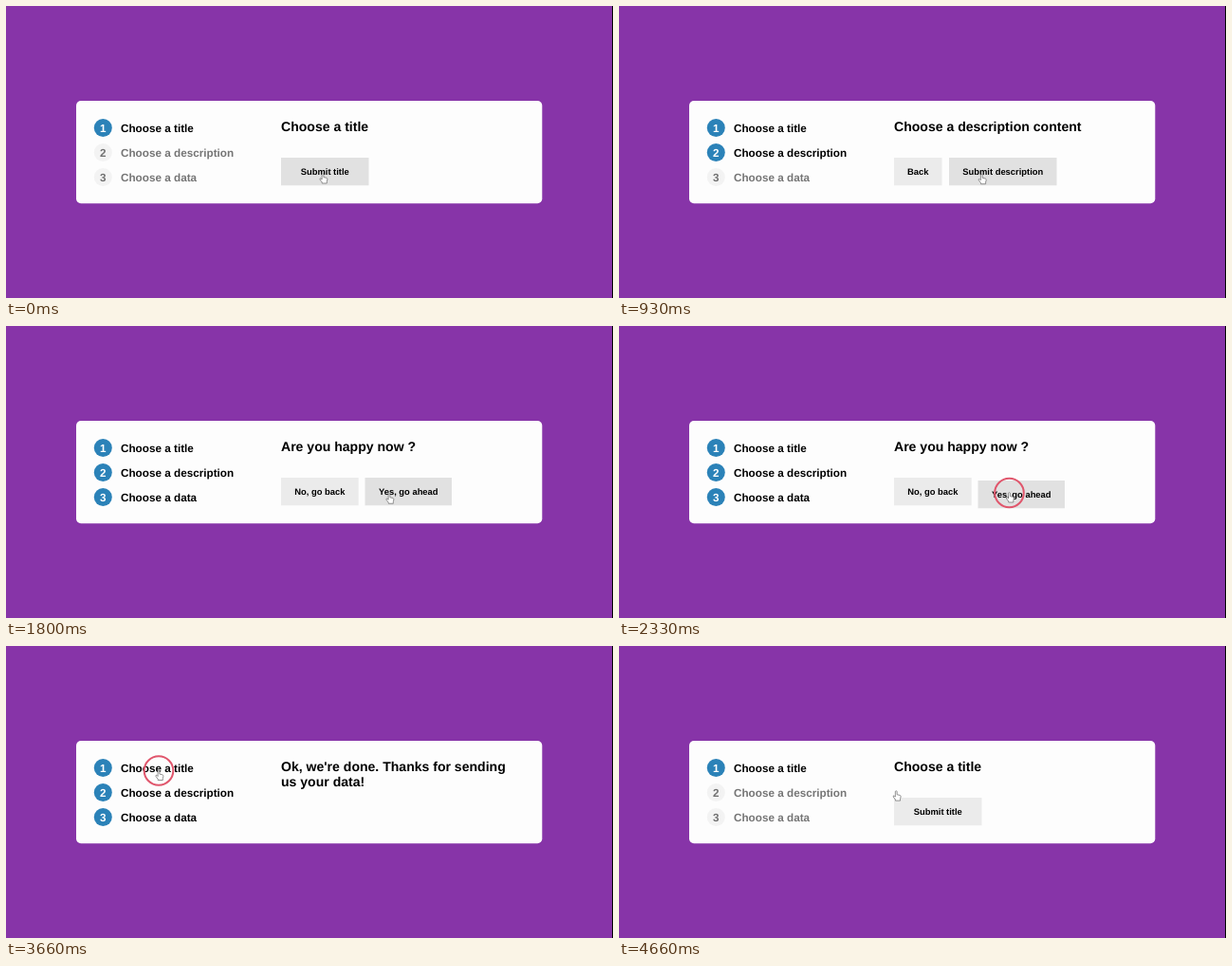
An HTML page with a canvas that plays this animation: 640x308 px, repeating every 4730 ms.

```html
<!DOCTYPE html>
<html lang="en">
<head>
<meta charset="utf-8">
<title>Step form</title>
<style>
  html, body { margin: 0; width: 100%; height: 100%; overflow: hidden; background: #8734a8; }
  canvas { display: block; }
</style>
</head>
<body>
<canvas id="stage" width="640" height="308"></canvas>
<script>
const ctx = document.getElementById('stage').getContext('2d');
const LOOP = 4730, FRAME = LOOP / 71, FADE = 300;

const steps = [
  { label: 'Choose a title', on: -1000, off: 9999 },
  { label: 'Choose a description', on: 325, off: 3910 },
  { label: 'Choose a data', on: 1395, off: 3910 }
];

// Button: label, left, width, hover start, hover end
const titleForm = hover => ({ lines: ['Choose a title'], buttons: [['Submit title', 290, 92.5, ...hover]] });
const screens = [
  { from: 0, ...titleForm([-1000, 9999]) },
  { from: 325, lines: ['Choose a description content'],
    buttons: [['Back', 290, 50.5, -1000, 632], ['Submit description', 348, 113.5, 683, 9999]] },
  { from: 1395, lines: ['Are you happy now ?'],
    buttons: [['No, go back', 290, 81.7, 9999, 9999], ['Yes, go ahead', 378.5, 91.5, 1395, 9999]] },
  { from: 2460, lines: ["Ok, we're done. Thanks for sending", 'us your data!'], buttons: [] },
  { from: 3910, ...titleForm([9999, 9999]) }
];

// Pointer tip: time, x, y
const path = [
  [0, 334, 177], [575, 334, 177], [1060, 399.5, 178], [1640, 399.5, 178], [2060, 411.5, 176],
  [3064, 411.5, 176], [3131, 366.5, 169], [3530, 161, 131.5], [4380, 161, 131.5],
  [4663, 292, 153], [LOOP, 334, 177]
];
const arrowTimes = [[632, 683], [2460, 3367], [4550, 4640]];
const clicks = [[130, 325], [1195, 1395], [2260, 2460], [3660, 3860]];
const RING_TAIL = 66;

const within = (t, [a, b]) => t >= a && t < b;
const clamp = x => Math.min(1, Math.max(0, x));

// CSS "ease" curve, solved by bisection
function ease(x) {
  x = clamp(x);
  let lo = 0, hi = 1;
  const curve = (s, a, b) => 3 * a * s * (1 - s) ** 2 + 3 * b * s * s * (1 - s) + s ** 3;
  for (let i = 0; i < 20; i++) {
    const mid = (lo + hi) / 2;
    if (curve(mid, .25, .25) < x) lo = mid; else hi = mid;
  }
  return curve(lo, .1, 1);
}
const level = (t, on, off) => ease((t - on) / FADE) - (t > off ? ease((t - off) / FADE) : 0);

function mix(a, b, p) {
  return `rgb(${a.map((v, i) => Math.round(v + (b[i] - v) * clamp(p)))})`;
}
const grey = v => [v, v, v];

function text(str, x, y, size, color, align = 'left') {
  ctx.font = `bold ${size}px "Liberation Sans", Arial, sans-serif`;
  ctx.textAlign = align;
  ctx.fillStyle = color;
  ctx.fillText(str, x, y);
}

function drawStep({ label, on, off }, i, t) {
  const y = 128.5 + i * 26;
  const p = level(t, on, off);
  ctx.fillStyle = mix(grey(243), [43, 130, 184], p);
  ctx.beginPath();
  ctx.arc(102.3, y, 9.5, 0, 7);
  ctx.fill();
  text(i + 1, 102.3, y + 4, 11.72, mix(grey(112), grey(255), level(t, on, off + 200)), 'center');
  text(label, 121, y + 4.1, 11.72, mix(grey(117), grey(0), p));
}

function drawScreen({ lines, buttons }, t) {
  lines.forEach((line, i) => text(line, 290, 131.7 + i * 16, 14.06, '#000'));
  const pressed = clicks.some(c => within(t, c));
  for (const [label, x, w, on, off] of buttons) {
    const y = 160 + (pressed && t >= on && t < off ? 3 : 0);
    ctx.fillStyle = mix(grey(235), grey(225), level(t, on, off));
    ctx.fillRect(x, y, w, 29.3);
    text(label, x + w / 2, y + 17.7, 9.38, '#000', 'center');
  }
}

const hand = new Path2D('M-.9 .2Q0-.8 .9 .2V3.6L4 4.3Q5 4.7 4.9 5.8L4.3 8.2V10H-.8V8.9L-3 6Q-3.4 4.6-2.2 4.7L-.9 6Z');
const arrow = new Path2D('M0 0V8L1.7 6.4L2.8 9L4 8.5L2.9 6H4.8Z');

function drawPointer(t) {
  const i = path.findIndex(k => k[0] > t);
  const [t0, x0, y0] = path[i - 1], [t1, x1, y1] = path[i];
  const p = (t - t0) / (t1 - t0);
  ctx.save();
  ctx.translate(x0 + (x1 - x0) * p, y0 + (y1 - y0) * p);

  const click = clicks.find(([a, b]) => within(t, [a, b + RING_TAIL]));
  if (click) {
    ctx.strokeStyle = '#e0566c';
    ctx.lineWidth = 2;
    ctx.beginPath();
    ctx.arc(0, 0, 15.3, 0, 7);
    ctx.stroke();
  }

  const shape = arrowTimes.some(a => within(t, a)) ? arrow : hand;
  ctx.fillStyle = '#fff';
  ctx.strokeStyle = '#777';
  ctx.lineWidth = .8;
  ctx.fill(shape);
  ctx.stroke(shape);
  ctx.restore();
}

function draw(now) {
  // The picture steps at 15 frames per second
  const t = Math.floor((now % LOOP + 7) / FRAME) % 71 * FRAME;
  ctx.fillStyle = '#8734a8';
  ctx.fillRect(0, 0, 640, 308);
  ctx.fillStyle = '#000';
  ctx.fillRect(639, 0, 1, 308);
  ctx.fillStyle = '#fdfdfd';
  ctx.beginPath();
  ctx.roundRect(74, 100, 491.3, 108.2, 5);
  ctx.fill();
  steps.forEach((s, i) => drawStep(s, i, t));
  drawScreen(screens.findLast(s => t >= s.from), t);
  drawPointer(t);
}

ctx.textRendering = 'geometricPrecision';
const start = performance.now();
function tick() {
  draw(performance.now() - start);
  requestAnimationFrame(tick);
}
tick();
</script>
</body>
</html>
```
